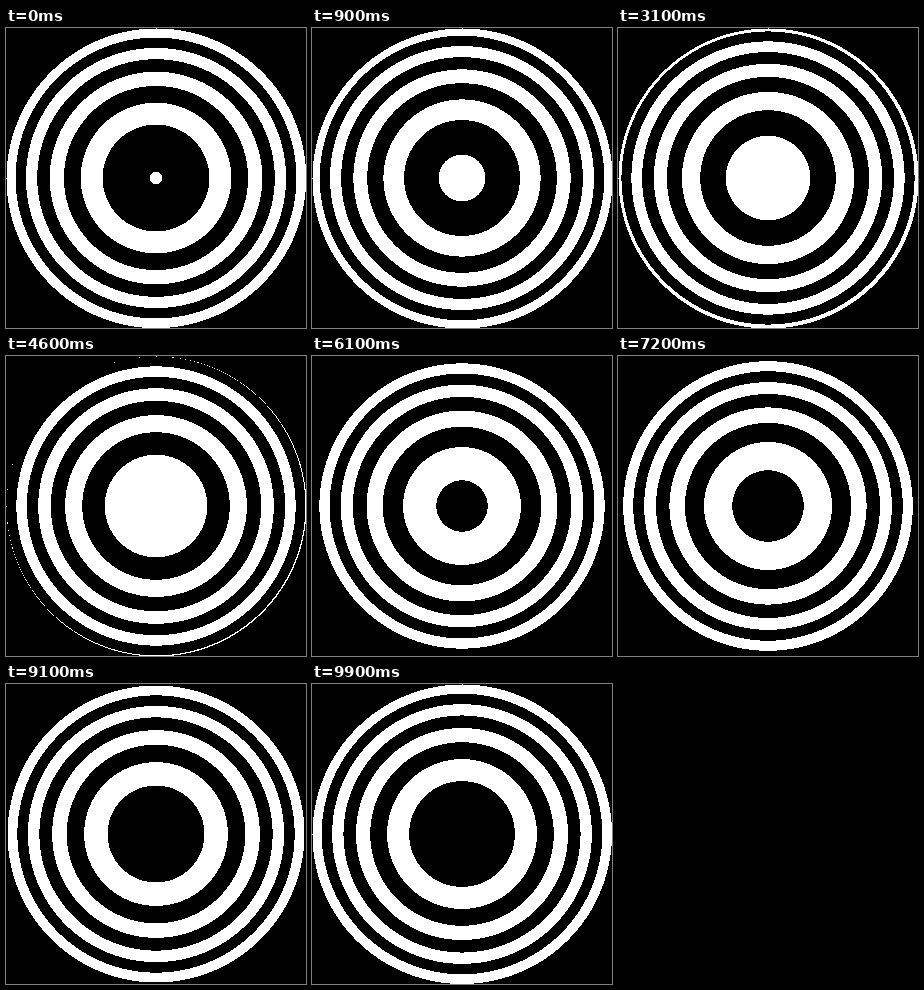
Write an HTML page with a canvas that moves like this. It is 300 px wide and 300 px high and loops after 10000 ms.

```html
<!DOCTYPE html>
<html lang="en">
<head>
<meta charset="utf-8">
<title>Expanding rings</title>
<style>
  html, body { margin: 0; width: 100%; height: 100%; overflow: hidden; background: #000; }
  canvas { display: block; width: 100%; height: 100%; image-rendering: pixelated; }
</style>
</head>
<body>
<canvas id="stage" width="300" height="300"></canvas>
<script>
const SIZE = 300, HALF = SIZE / 2;
const STEPS = 100, STEP_MS = 100;
const RINGS = 4;                           // black and white pairs across the disc
const UNIT = HALF * HALF / (RINGS * STEPS); // squared radius gained per step
const START = 0.7;

const ctx = document.getElementById('stage').getContext('2d');
const image = ctx.createImageData(SIZE, SIZE);
const pixels = new Uint32Array(image.data.buffer);
const BLACK = 0xff000000, WHITE = 0xffffffff;

// Squared distance from the centre in steps, or -1 outside the disc
const field = new Float64Array(SIZE * SIZE);
for (let y = 0; y < SIZE; y++) {
  for (let x = 0; x < SIZE; x++) {
    const inside = (x - HALF) ** 2 + (y - HALF) ** 2 <= HALF * HALF;
    const d2 = (x + 0.5 - HALF) ** 2 + (y + 0.5 - HALF) ** 2;
    field[y * SIZE + x] = inside ? d2 / UNIT : -1;
  }
}

function draw(step) {
  const phase = step + START;
  for (let i = 0; i < field.length; i++) {
    const band = Math.floor((field[i] - phase) / (STEPS / 2));
    pixels[i] = field[i] >= 0 && band & 1 ? WHITE : BLACK;
  }
  ctx.putImageData(image, 0, 0);
}

let start = null, shown = 0;
function tick(now) {
  if (start === null) start = now;
  const step = Math.floor(Math.max(0, now - start) / STEP_MS) % STEPS;
  if (step !== shown) draw(shown = step);
  requestAnimationFrame(tick);
}
draw(0);
requestAnimationFrame(tick);
</script>
</body>
</html>
```
